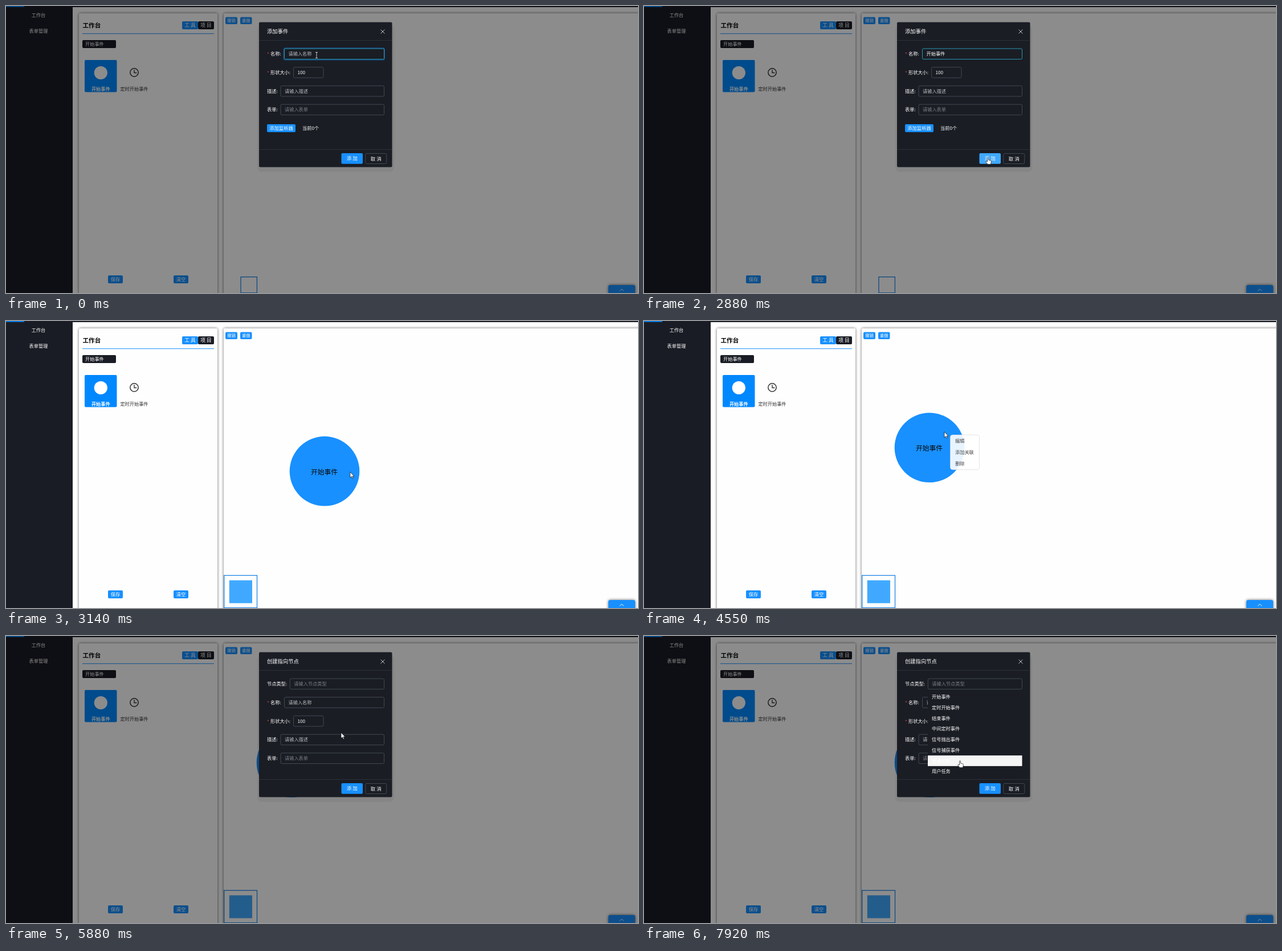
Recreate the animation shown at these times as an HTML page. Size 1109 px wide and 505 px high, loop 8 s.

```html
<!DOCTYPE html>
<html lang="zh">
<head>
<meta charset="utf-8">
<title>工作台</title>
<style>
  html, body { margin: 0; width: 100%; height: 100%; overflow: hidden; background: #fff; }
  svg { display: block; width: 100%; height: 100%; font-family: "Noto Sans CJK SC", "Noto Sans CJK", sans-serif; }
  text { white-space: pre; }
  .panel { filter: drop-shadow(0 0 2.5px rgba(0, 0, 0, .6)); }
</style>
</head>
<body>
<svg id="stage" viewBox="0 0 1109 505"></svg>
<script>
const BLUE = '#1890ff', DARK = '#191c24', MODAL = '#1a1d24', BORDER = '#434850', DIM = '#7b7e84', PALE = '#b9bbbe';
const LOOP = 8000, ROW = 18.7, LIST_TOP = 98;

// Drawing helpers, all returning SVG markup
const box = (x, y, w, h, fill, r = 0, extra = '') =>
  `<rect x="${x}" y="${y}" width="${w}" height="${h}" rx="${r}" fill="${fill}" ${extra}/>`;
const frame = (x, y, w, h, stroke, r = 0, extra = '') => box(x, y, w, h, 'none', r, `stroke="${stroke}" ${extra}`);
const line = (d, stroke, width = 1) => `<path d="${d}" fill="none" stroke="${stroke}" stroke-width="${width}"/>`;
const label = (x, y, str, fill = '#fff', size = 8.2, extra = '') =>
  `<text x="${x}" y="${y + size * .37}" font-size="${size}" fill="${fill}" ${extra}>${str}</text>`;
const centered = (x, y, str, fill, size, extra = '') => label(x, y, str, fill, size, `text-anchor="middle" ${extra}`);
const button = (x, y, w, h, str, fill = BLUE, size = 8.3, extra = '') =>
  box(x, y, w, h, fill, 2, extra) + centered(x + w / 2, y + h / 2, str, '#fff', size, 'font-weight="500"');
const group = (id, content) => `<g id="${id}">${content}</g>`;

function field(y, name, x, hint, { required, color = DIM, width = 663.5 - x, id = '' } = {}) {
  return (required ? label(458, y + 1, '*', '#e0444a') : '') +
    label(required ? 464 : 458, y, name + ':', '#fff', 8.2, 'font-weight="500"') +
    frame(x, y - 9.3, width, 18.6, BORDER, 2, id && `id="${id}Box"`) +
    label(x + 7, y, hint, color, 8.2, id && `id="${id}Text"`);
}

function modal(id, title, body) {
  return group(id,
    box(441, 33, 240, 259, '#000018', 8, 'opacity=".05"') + box(444, 28.5, 233.5, 255, MODAL, 2) +
    label(458, 45, title, '#fff', 9.3, 'font-weight="500"') +
    line('M657.5 41.5l7 7m0-7l-7 7', '#c4c5c8') +
    line('M444 60.5h233.5M444 252.5h233.5', '#2c3037') + body +
    button(588.5, 259, 37.5, 18.7, '添 加', BLUE, 8.5, `id="${id}Ok"`) +
    frame(630.8, 259.5, 37, 18, BORDER, 2) + centered(649.3, 268.5, '取 消', '#fff', 8.5, 'font-weight="500"'));
}

const sizeField = y => field(y, '形状大小', 504.5, '100', { required: true, color: '#fff', width: 52.5 });
const options = ['开始事件', '定时开始事件', '结束事件', '中间定时事件', '信号抛出事件', '信号捕获事件', '普通任务', '用户任务'];

const page =
  box(0, 0, 1109, 505, '#fff') + box(0, 0, 1109, 2, DARK) + box(0, 0, 117, 505, DARK) + box(0, 0, 32, 1.7, '#0088ff') +
  centered(57, 16, '工作台') + centered(57, 44, '表单管理') +
  box(128, 13, 243, 500, '#fefefe', 2, 'class="panel"') + box(382, 13, 740, 500, '#fefefe', 2, 'class="panel"') +
  label(134.5, 34, '工作台', '#000', 10.6, 'font-weight="700"') +
  button(309, 27, 28, 14, '工 具', BLUE, 8.7) + button(337, 27, 28, 14, '项 目', DARK, 8.7) +
  line('M134 48.7H365', BLUE) + box(134, 60, 59, 14, DARK, 2) + label(139, 67, '开始事件') +
  box(138, 95, 56.5, 56.5, '#0088ff', 2) + '<circle cx="166.3" cy="117.5" r="11.6" fill="#fff"/>' +
  centered(166.3, 145.5, '开始事件', '#fff', 8.2, 'font-weight="700"') +
  '<circle cx="225" cy="117" r="7.2" fill="none" stroke="#333" stroke-width="1.5"/>' +
  line('M225 112.3v5.2h4.3', '#333', 1.4) + centered(225, 145.5, '定时开始事件', '#333') +
  button(179, 474, 26, 14, '保存') + button(294, 474, 26, 14, '清空') +
  button(385, 19.5, 21, 12.5, '撤销', BLUE, 7.3) + button(411, 19.5, 20.5, 12.5, '重做', BLUE, 7.3) +
  group('node', `<circle r="61.3" fill="${BLUE}"/>` + centered(-.5, 1, '开始事件', '#0a0a0a', 11.8)) +
  group('mapEmpty', frame(412, 476.7, 28.4, 28, '#1f85e6', 0, 'stroke-width="1.3"')) +
  group('mapFull', box(382.7, 447.6, 57.8, 57, '#fff', 0, 'stroke="#1f85e6" stroke-width="1.3"') +
    box(391.8, 456.3, 40.2, 40.2, '#40a9ff')) +
  box(1057, 491, 47, 20, BLUE, 3, 'class="panel"') + line('M1077 501.5l3.5-3.5 3.5 3.5', '#fff') +
  group('menu', box(537.5, 200.5, 51, 61, '#fff', 4, 'fill-opacity=".9" stroke="#ddd" stroke-width=".8"') +
    ['编辑', '添加关联', '删除'].map((s, i) => label(546, 211 + 20 * i, s, '#444')).join(''));

const eventModal = modal('eventModal', '添加事件',
  frame(487.3, 73.9, 177, 21, '#177ddc', 3, 'id="glow" stroke-width="1.5" opacity=".5"') +
  field(84.3, '名称', 488.5, '请输入名称', { required: true, color: PALE, id: 'name' }) + sizeField(117) +
  field(149.7, '描述', 482, '请输入描述', { color: PALE }) + field(182.4, '表单', 482, '请输入表单') +
  button(458, 208, 50, 14, '添加监听器') + label(520, 215, '当前0个', '#fff', 8.2, 'font-weight="500"'));

const linkModal = modal('linkModal', '创建指向节点',
  field(84.3, '节点类型', 498.3, '请输入节点类型', { id: 'type' }) +
  field(117, '名称', 488.5, '请输入名称', { required: true, color: PALE }) + sizeField(149.7) +
  field(182.4, '描述', 482, '请输入描述', { color: PALE }) + field(215.2, '表单', 482, '请输入表单') +
  group('list', box(498, LIST_TOP, 166, ROW * 8, MODAL) + box(498, LIST_TOP, 165.5, ROW, '#f5f5f5', 0, 'id="active"') +
    options.map((s, i) => label(505, LIST_TOP + ROW * (i + .5), s)).join('')));

const candidates = group('candidates', box(510, 95, 365, 37, '#f5f5f5', 0, 'id="bar"') + label(516, 106, '', '#222', 9, 'id="choices"'));

const pointer = group('pointer',
  '<path id="arrow" d="M0 0V10L2.3 7.9 4 11.6 5.5 10.9 3.9 7.4H7Z" fill="#fff" stroke="#111" stroke-width=".7"/>' +
  '<path id="hand" d="M-1 1Q0-.6 1 1V5L5 6Q6 6.3 5.8 8L5 12.5H-.5L-4 8Q-3.5 6-1 8Z" fill="#fff" stroke="#111" stroke-width=".7"/>' +
  '<path id="beam" d="M-2-4.5h4M0-4.5v10M-2 5.5h4" fill="none" stroke="#d8d8d8" stroke-width=".9"/>');

const stage = document.getElementById('stage');
stage.innerHTML = page + box(0, 0, 1109, 505, '#000', 0, 'id="mask"') + eventModal + linkModal + candidates + pointer;
const el = Object.fromEntries([...stage.querySelectorAll('[id]')].map(e => [e.id, e]));

// The screen refreshes in bursts: first tick, last tick, number of ticks
const bursts = [[140, 1140, 8], [1290, 1410, 2], [1680, 1680, 1], [2100, 3140, 9], [3270, 4150, 7],
  [4400, 4550, 2], [4860, 5880, 9], [6130, 7110, 8], [7250, 7920, 6]];
function snap(t) {
  const burst = bursts.filter(b => b[0] <= t).pop();
  if (!burst) return 0;
  const [from, to, n] = burst, gap = (to - from) / (n - 1) || 1;
  return from + gap * Math.min(n - 1, Math.floor((t - from + 16) / gap));
}

// Typing states: time, committed text, pinyin being composed
const typing = [[140, '', 'k'], [280, '', 'kai'], [425, '', "kai'sh"], [568, '', "kai'shi"], [853, '开始', ''],
  [996, '开始', 'sh'], [1139, '开始', 'shi'], [1290, '开始', "shi'ji"], [1410, '开始', "shi'jian"], [1680, '开始事件', '']];

const path = [[2100, 545, 86], [2850, 603.5, 266], [3270, 604, 265.5], [3410, 585, 236], [3990, 527, 195],
  [4860, 527, 195], [5370, 585, 239.5], [5625, 585, 239.5], [5880, 588, 170], [6130, 586, 155], [6410, 570, 84],
  [6690, 570, 84], [6970, 567.5, 121], [7110, 567, 127], [7250, 566, 132], [7790, 554.5, 219]];

const clamp = v => Math.min(1, Math.max(0, v));
const ease = v => v * v * (3 - 2 * v);
const ramp = (t, from, to) => clamp((t - from) / (to - from));
const show = (e, on) => e.setAttribute('opacity', +on);

function pointerAt(t) {
  const i = path.findIndex(p => p[0] > t);
  if (i === 0) return path[0].slice(1);
  if (i < 0) return path[path.length - 1].slice(1);
  const [t0, x0, y0] = path[i - 1], [t1, x1, y1] = path[i], k = (t - t0) / (t1 - t0);
  return [x0 + (x1 - x0) * k, y0 + (y1 - y0) * k];
}

function zoom(e, amount, ox, oy) {
  const s = .2 + .8 * amount;
  e.setAttribute('transform', `translate(${ox * (1 - s)} ${oy * (1 - s)}) scale(${s})`);
  show(e, amount);
}

function drawTyping(t) {
  const state = typing.filter(s => s[0] <= t).pop();
  const composing = state ? state[2] : '';
  el.nameText.innerHTML = state ? `${state[1]}<tspan text-decoration="underline">${composing}</tspan>` : '请输入名称';
  el.nameText.setAttribute('fill', state ? '#fff' : PALE);
  el.nameBox.setAttribute('stroke', '#2a98b4');
  show(el.glow, t < 2800 ? .5 : 0);
  show(el.candidates, composing !== '');
  el.bar.setAttribute('height', t < 1400 ? 37 : 22);
  el.choices.textContent = state && state[1] ? '1 事件   2 时间   3 实践   4 世间   5 试件   6 十件   7 是' : '1 开始   2 开市   3 开   4 凯   5 楷   6 慨   7 揩';
}

function drawPointer(t) {
  const [x, y] = pointerAt(t);
  const beam = t < 2200;
  const hand = t > 2740 && t < 2950 || t >= 6380;
  el.pointer.setAttribute('transform', `translate(${x} ${y})`);
  show(el.pointer, t < 140 || t >= 2100);
  show(el.beam, beam);
  show(el.hand, hand);
  show(el.arrow, !beam && !hand);
}

function render(t) {
  drawTyping(t);
  drawPointer(t);

  const closing = ramp(t, 2900, 3130), opening = ramp(t, 5425, 5725);
  zoom(el.eventModal, 1 - ease(closing), 560.5, 156);
  zoom(el.linkModal, 1 - (1 - opening) ** 2.62, 585, 239.5);
  show(el.mask, .45 * (t < 4000 ? 1 - closing : opening));
  el.eventModalOk.setAttribute('fill', t > 2740 ? '#40a9ff' : BLUE);

  const created = t >= 3000, drag = ramp(t, 3410, 3990);
  show(el.node, created);
  el.node.setAttribute('transform', `translate(${559 - 58 * drag} ${264.3 - 41.5 * drag})`);
  show(el.mapFull, created);
  show(el.mapEmpty, !created);
  show(el.menu, t < 5400 ? ramp(t, 4300, 4500) : 0);

  el.typeBox.setAttribute('stroke', t > 6400 && t < 7900 ? '#238fdd' : BORDER);
  show(el.list, ramp(t, 6480, 6680));
  const row = Math.max(0, Math.floor((pointerAt(t - 100)[1] - LIST_TOP) / ROW));
  el.active.setAttribute('y', LIST_TOP + ROW * (t < 6900 ? 0 : row));
}

function tick() {
  render(snap(performance.now() % LOOP));
  requestAnimationFrame(tick);
}
tick();
</script>
</body>
</html>
```
